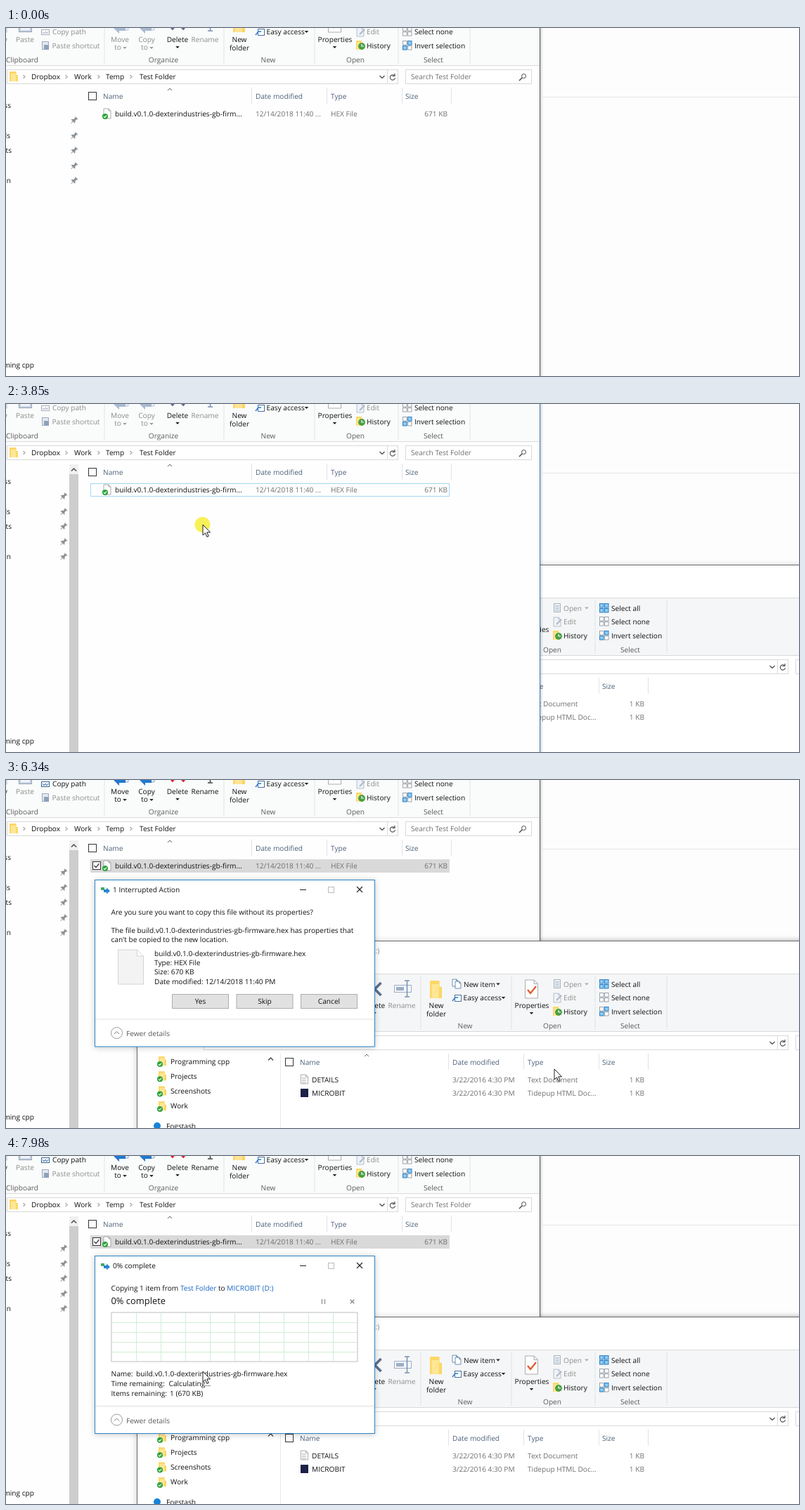
Write an HTML page that moves like this. It is 1128 px wide and 496 px high and loops after 8000 ms.

```html
<!DOCTYPE html>
<html lang="en">
<head>
<meta charset="utf-8">
<title>Copying a file to a drive</title>
<style>
  html, body { margin: 0; width: 100%; height: 100%; overflow: hidden; background: #fdfdfd; }
  svg { display: block; width: 100%; height: 100%; }
  text { font: 10.15px "Open Sans", "Noto Sans", sans-serif; text-rendering: geometricPrecision; white-space: pre; fill: #111; }
  .gray { fill: #8c8c8c; }
  .info { fill: #6f6f6f; }
  .label { fill: #5a5a5a; }
  .head { fill: #4c607a; }
  .white { fill: #fff; }
  .link { fill: #1a66c4; }
  .big { font-size: 12.9px; }
  .mid { text-anchor: middle; }
  .end { text-anchor: end; }
  .line { fill: none; stroke: #555; }
  .window { filter: drop-shadow(0 1px 4px rgba(0, 0, 0, .22)); }
</style>
</head>
<body>
<svg id="stage" viewBox="0 0 1128 496"></svg>
<script>
// Basic shapes. Text is placed by the middle of its capitals.
const text = (x, y, s, cls = '') => `<text x="${x}" y="${y + 4}" class="${cls}">${s}</text>`;
const mid = (x, y, s, cls = '') => text(x, y, s, 'mid ' + cls);
const rect = (x, y, w, h, fill, stroke = 'none') =>
  `<rect x="${x}" y="${y}" width="${w}" height="${h}" fill="${fill}" stroke="${stroke}"/>`;
const box = (x, y, w, h, fill, stroke) => rect(x + .5, y + .5, w - 1, h - 1, fill, stroke);
const line = (d, color = '#555', w = 1) => `<path class="line" d="${d}" style="stroke:${color};stroke-width:${w}"/>`;
const shape = (d, fill) => `<path d="${d}" fill="${fill}"/>`;
const dot = (x, y, r, fill, stroke = 'none') => `<circle cx="${x}" cy="${y}" r="${r}" fill="${fill}" stroke="${stroke}"/>`;
const group = (cls, body) => `<g class="${cls}">${body}</g>`;
const vline = (x, y, h, color = '#e2e3e4') => rect(x, y, 1, h, color);

// Icons
const drop = (x, y, color = '#222') => shape(`M${x - 2.8} ${y - 1}h5.6l-2.8 3z`, color);
const chevron = (x, y) => line(`M${x - 1.5} ${y - 2.5}l2.5 2.5l-2.5 2.5`, '#666');
const down = (x, y) => line(`M${x - 3.5} ${y - 2}l3.5 3.5l3.5 -3.5`, '#444', 1.2);
const up = (x, y) => line(`M${x - 3.5} ${y + 1.5}l3.5 -3.5l3.5 3.5`, '#444', 1.4);
const cross = (x, y, r, color, w) => line(`M${x - r} ${y - r}l${2 * r} ${2 * r}m0 ${-2 * r}l${-2 * r} ${2 * r}`, color, w);
const page = (x, y, w, h, fill = '#fff', stroke = '#999', f = w * .3) =>
  `<path d="M${x} ${y}h${w - f}l${f} ${f}v${h - f}h${-w}z M${x + w - f} ${y}v${f}h${f}" fill="${fill}" stroke="${stroke}" stroke-width=".8"/>`;
const folder = (x, y, w = 11, h = 13) =>
  shape(`M${x} ${y}h${w * .8}v${h * .35}h${w * .2}v${h * .65}h${-w}z`, '#fbd766') + rect(x + w * .15, y + h * .2, w * .6, h * .8, '#ffe694');
const badge = (x, y) => dot(x, y, 4, '#2da33b') + line(`M${x - 2} ${y}l1.5 1.6l2.7 -3`, '#fff', 1.1);
const pushpin = (x, y, k = 1, color = '#8b9299') =>
  `<g transform="translate(${x} ${y}) rotate(45) scale(${k})">` + shape('M-2.5 -5h5v1l-1 .7v2.8l2 2v1h-3v3.5h-1v-3.5h-3v-1l2 -2v-2.8l-1 -.7z', color) + '</g>';
const drive = (x, y) => rect(x - 6, y - 1, 12, 4.5, '#333') + shape(`M${x - 4} ${y - 3}h8l2 2h-12z`, '#999') + rect(x + 3, y + 1, 2, 1, '#9f9');
const checkbox = (x, y, on) => box(x, y, 12, 12, '#fff', '#333') + (on ? line(`M${x + 2.5} ${y + 6}l2.5 2.7l4.5 -5.5`, '#222', 1.2) : '');
const refresh = (x, y) => line(`M${x + 2.5} ${y - 2}a3.6 3.6 0 1 0 1 3M${x + 3} ${y - 5}v3.5h-3.5`, '#555', 1.2);
const tiles = (y, ...fills) => fills.map((f, i) =>
  box(844 + i % 2 * 7, y - 7 + (i >> 1) * 7, 6.5, 6.5, f, f === '#fff' ? '#9aa3ab' : '#2b7fc4')).join('');
const transfer = (x, on) => page(x + 4, 284, 17, 24, on ? '#e6f1fb' : '#e9eef5', on ? '#6d9bc8' : '#b3c0d2') +
  shape(`M${x} 305l8 -8v5h9v7h-9v4z`, on ? '#2277cf' : '#a9bad1');

// Explorer ribbon; `on` is the state with a file selected.
function ribbon(right, on) {
  const soft = on ? '' : 'gray', arrow = on ? '#222' : '#999', slate = '#5c6f8f';
  let s = rect(187, 277, right - 187, 81, on === null ? '#f5f6f7' : '#fafbfb') + rect(187, 358, right - 187, 1, '#d9dadb');
  s += [420, 590, 719, 838, 940].map(x => vline(x - .5, 280, 76)).join('');
  s += pushpin(220, 299, 2) + mid(221, 321, 'Pin to Quick') + mid(221, 332, 'access');
  s += page(260, 285, 14, 20, '#eef2f7', '#9fb0c8') + page(267, 291, 14, 20, '#eef2f7', '#9fb0c8') + mid(270, 321, 'Copy', on ? '' : 'gray');
  s += box(298, 286, 19, 25, '#c9d3e0', '#8fa1ba') + rect(303, 284, 9, 5, '#7d8fa9') + rect(301, 290, 13, 18, '#f2f5f9') + mid(307, 321, 'Paste', 'gray');
  s += line('M333 285l6 9M339 285l-6 9', '#8793a4') + dot(333, 296, 2, 'none', '#8793a4') + dot(339, 296, 2, 'none', '#8793a4') + text(346, 291, 'Cut', soft);
  s += box(330, 307, 12, 8, '#fff', on ? '#336699' : '#a4adb9') + line('M332 310l2 3l2 -3l2 3l2 -3', on ? '#336699' : '#a4adb9') + text(346, 310, 'Copy path', soft);
  s += box(331, 324, 10, 12, '#e4e9f0', '#9eabbc') + rect(334, 329, 7, 7, '#8fa1ba') + text(345.5, 329.5, 'Paste shortcut', 'gray');
  s += transfer(433, on) + mid(442, 321, 'Move', soft) + mid(439, 332, 'to', soft) + drop(449, 333, arrow);
  s += transfer(470, on) + mid(480, 321, 'Copy', soft) + mid(477, 332, 'to', soft) + drop(487, 333, arrow);
  s += cross(524.5, 298, 9, on ? '#d8242f' : slate, 3.6) + mid(524, 321, 'Delete') + drop(524, 332);
  s += box(552, 292, 25, 11, '#f3f6fa', on ? '#3a7fc2' : '#9caec7') + rect(555, 295, 11, 5, on ? '#3a7fc2' : '#9caec7') +
    line('M567 286h7M567 309h7M570.5 286v23', on ? '#444' : '#7890b0', 1.5) + mid(563, 321, 'Rename', soft);
  s += folder(603, 286, 17, 25) + mid(612, 321, 'New') + mid(612, 332.5, 'folder');
  s += page(635, 284, 8, 10, '#fff', '#48749f') + page(639, 287, 8, 10, '#fff', '#48749f') + text(651, 290.5, 'New item') + drop(700, 290.5);
  s += box(638, 306, 10, 10, '#fff', '#48749f') + line('M635 315l4 -5h4', '#2277cf', 1.4) + text(650.5, 310, 'Easy access') + drop(707.5, 310);
  s += page(738.5, 285, 18, 26) + line('M742 299l4 5l8 -10', '#e4572e', 2.2) + mid(748, 321, 'Properties') + drop(747.5, 332);
  s += box(779, 284, 10, 13, '#f0f3f6', '#a8b3bf') + line('M781 288h6M781 291h6M781 294h6', '#9ab') + text(793, 290.5, 'Open', 'gray') + drop(826, 290.5, '#aaa');
  s += page(779, 304, 10, 13, '#f0f3f6', '#a8b3bf') + line('M783 314l7 -7', '#a8b9cc', 2) + text(793, 310, 'Edit', 'gray');
  s += folder(778, 323, 10, 13) + dot(786, 331, 5, '#4aa043') + line('M786 328v3h3', '#fff', 1.2) + text(793, 329.5, 'History');
  s += tiles(291, ...Array(4).fill('#8ecbf5')) + text(861, 290.5, 'Select all');
  s += tiles(310, ...Array(4).fill('#fff')) + text(861, 310, 'Select none');
  s += tiles(330, '#fff', '#8ecbf5', '#8ecbf5', '#fff') + text(861, 329.5, 'Invert selection');
  return s + [[303, 'Clipboard'], [504, 'Organize'], [653, 'New'], [777, 'Open'], [888, 'Select']]
    .map(([x, name]) => mid(x, 350, name, 'label')).join('');
}

const addressBar = end => box(281, 364, end - 281, 21, '#fff', '#d9d9d9') + vline(end - 16, 365, 19, '#d9d9d9') +
  down(end - 23, 375) + refresh(end - 8, 375);

const columns = () => checkbox(397, 396) + line('M510 394l3 -3l3 3', '#666') +
  [[418, 'Name'], [635, 'Date modified'], [742, 'Type'], [848, 'Size']].map(([x, s]) => text(x, 401.5, s, 'head')).join('') +
  [629, 736, 843, 913].map(x => vline(x, 390, 23)).join('');

const fileRow = (y, name, date, type, size) => text(435, y, name) + text(635, y, date, 'info') +
  text(742, y, type, 'info') + text(908, y, size, 'info end');

function driveWindow() {
  let s = group('window', box(186, 229, 960, 300, '#fff', '#6a6a6a'));
  s += drive(201, 244) + vline(214.5, 237, 10, '#777') + page(225, 237, 10, 13) + line('M227 243l2.5 3l4 -5', '#e4572e', 1.5) +
    folder(245, 237) + line('M263 241.5h6') + drop(266, 245) + vline(276, 237, 10, '#777');
  s += rect(391, 232, 62, 25, '#bdf096') + rect(391, 257, 62, 20, '#f4fbee') + mid(422, 244, 'Drive Tools', 'label') + text(465, 242.5, 'MICROBIT (D:)', 'gray');
  s += ribbon(1128, null) + rect(187, 276, 941, 1, '#dadbdc') + rect(187, 257, 49, 20, '#1979ca') + mid(212, 267, 'File', 'white');
  s += box(236, 257, 52, 21, '#f5f6f7', '#dadbdc') + rect(237, 276, 50, 3, '#f5f6f7') +
    [[262, 'Home'], [314, 'Share'], [364, 'View'], [421, 'Manage']].map(([x, n]) => mid(x, 267, n)).join('');
  s += line('M209 374h-10l4 -4m-4 4l4 4M226 374h10l-4 -4m4 4l-4 4M248 373l3 3l3 -3', '#c8c8c8', 1.3) + line('M269 379v-9l-4 4m4 -4l4 4', '#444', 1.4);
  s += addressBar(1113) + box(1123, 364, 40, 21, '#fff', '#d9d9d9') + drive(291, 375) + chevron(306, 374) + text(316.5, 374, 'MICROBIT (D:)');
  s += ['Programming cpp', 'Projects', 'Screenshots', 'Work'].map((name, i) =>
    folder(217, 394 + i * 21.3) + badge(219, 405 + i * 21.3) + text(234, 400.5 + i * 21.3, name)).join('');
  s += dot(215, 493, 5, '#1683d8') + text(228, 492.5, 'Fogstash') + up(376.5, 398) + vline(390, 390, 106, '#e8e8e8');
  s += columns() + page(419.5, 420, 10, 13) + line('M421 425h6M421 428h6M421 431h6', '#aaa') + rect(419, 440, 11, 12, '#1c2148');
  return s + fileRow(427, 'DETAILS', '3/22/2016 4:30 PM', 'Text Document', '1 KB') +
    fileRow(446, 'MICROBIT', '3/22/2016 4:30 PM', 'Tidepup HTML Doc...', '1 KB');
}

function folderWindow() {
  const shifted = body => `<g transform="translate(-280 -305)">${body}</g>`;
  const pins = x => [131, 153, 174, 196, 217].map(y => pushpin(x, y + .5)).join('');
  const row = (fill, stroke) => box(120, 113, 511, 19, fill, stroke);
  let s = rect(0, 0, 759, 496, '#fefefe') + shifted(ribbon(1039, false)) + group('selected', shifted(ribbon(1039, true)));
  s += shifted(addressBar(838) + columns()) + folder(5, 62, 12, 14) + [26, 86, 132, 178].map(x => chevron(x, 69.5)).join('');
  s += [[36, 'Dropbox'], [97, 'Work'], [142, 'Temp'], [190, 'Test Folder']].map(([x, n]) => text(x, 69, n)).join('');
  s += box(568, 59, 180, 21, '#fff', '#d9d9d9') + text(576, 69, 'Search Test Folder', 'info') + dot(736.5, 68.5, 3, 'none', '#444') + line('M734 71l-4 4', '#444', 1.5);
  s += [[7, 110, 'Quick access'], [6, 153, 'Downloads'], [8, 174, 'Documents'], [7, 217, 'Plugin'], [40, 480, 'Programming cpp']]
    .map(([x, y, n]) => text(x, y, n, 'end')).join('');
  s += group('pinsWide', pins(97)) + group('pinsNarrow', pins(82));
  s += group('scrollbar', rect(90, 86, 13, 410, '#f0f0f0') + rect(90, 100, 13, 396, '#cdcdcd') + up(96.5, 94));
  s += group('focused', row('none', '#a5d6f5')) + group('hovered', row('#e5f3ff', '#c5e4fb') + checkbox(123, 116));
  s += group('selected', row('#cce8ff', '#99d1ff')) + group('inactive', row('#d9d9d9', '#d9d9d9')) + group('selected', checkbox(123, 116, true));
  s += page(139, 115, 10, 14) + badge(141, 126);
  s += shifted(fileRow(427, 'build.v0.1.0-dexterindustries-gb-firm...', '12/14/2018 11:40 ...', 'HEX File', '671 KB'));
  return s + rect(759, 0, 1, 496, '#555') + group('active', rect(759, 0, 1, 496, '#3d7ab8')) +
    [.16, .1, .06, .03].map((a, i) => rect(760 + i, 0, 1, 496, `rgba(0,0,0,${a})`)).join('');
}

function dialog(height, title, body) {
  const foot = 142 + height;
  return group('window', box(126, 142, 399, height, '#fff', '#2a84c9')) +
    rect(135, 153, 5, 4, '#46a957') + shape('M139 156h4v-2.5l5 4.5l-5 4.5v-2.5h-4z', '#2585cf') + text(152, 156, title) +
    line('M418 156.5h9', '#222') + box(458, 152, 9, 9, 'none', '#bbb') + cross(503, 156, 4, '#222', 1.1) + body +
    rect(127, foot - 40, 397, 1, '#dfdfdf') + dot(157.5, foot - 20, 8, 'none', '#999') + line(`M154 ${foot - 18.5}l3.5 -3.5l3.5 3.5`, '#777') +
    text(171, foot - 19.5, 'Fewer details', 'label');
}

function question() {
  const button = (x, name, fill = '#e1e1e1', stroke = '#adadad') => box(x, 305, 81, 21, fill, stroke) + mid(x + 40.5, 315, name);
  const lines = ['build.v0.1.0-dexterindustries-gb-firmware.hex', 'Type: HEX File', 'Size: 670 KB', 'Date modified: 12/14/2018 11:40 PM'];
  return dialog(238.5, '1 Interrupted Action',
    text(149.5, 187.5, 'Are you sure you want to copy this file without its properties?') +
    text(149.5, 214, 'The file build.v0.1.0-dexterindustries-gb-firmware.hex has properties that') +
    text(149.5, 227, 'can\'t be copied to the new location.') +
    page(159.5, 242, 36, 49, '#f3f3f3', '#ccc', 9) +
    lines.map((s, i) => text(211, 247 + i * 13.2, s)).join('') +
    button(236, 'Yes') + button(327.5, 'Skip') + button(419, 'Cancel') +
    group('overSkip', button(327.5, 'Skip', '#e5f1fb', '#2a84d2')) +
    group('overYes', button(236, 'Yes', '#e5f1fb', '#2a84d2')) +
    group('pressYes', button(236, 'Yes', '#cce4f7', '#005499')));
}

function progress() {
  let grid = '';
  for (let i = 1; i < 10; i++) grid += `M${150 + i * 35}.5 224v68`;
  for (let i = 1; i < 5; i++) grid += `M151 ${223.5 + i * 14}h348`;
  return dialog(254, '0% complete',
    `<text x="149.5" y="191.5">Copying 1 item from <tspan class="link">Test Folder</tspan> to <tspan class="link">MICROBIT (D:)</tspan></text>` +
    text(149.5, 206.5, '0% complete', 'big') + line('M449.5 204v7M453.5 204v7', '#999', 1.4) + cross(492.5, 207.5, 2.8, '#888', 1.3) +
    line(grid, '#d0eed3') + box(149.5, 222.5, 351, 71, 'none', '#bdbdbd') +
    text(149.5, 309.5, 'Name:') + text(185, 309.5, 'build.v0.1.0-dexterindustries-gb-firmware.hex') +
    text(149.5, 323.5, 'Time remaining:') + text(231.5, 323.5, 'Calculating...') +
    text(149.5, 337.5, 'Items remaining:') + text(233, 337.5, '1 (670 KB)'));
}

const pointer = () =>
  group('dragged', group('window', `<g opacity=".78">${rect(-46, -83, 93, 93, '#e6f2fa', '#c4dcec')}${page(-28, -74, 56, 75, '#f4f6f7', '#a9b4bb', 16)}</g>`)) +
  group('tip', box(11, 12, 132, 18, '#fff', '#bbb') + line('M18.5 17v8M14.5 21h8', '#2369c7', 1.5) + text(26, 20.5, 'Copy to <tspan class="link">MICROBIT (D:)</tspan>')) +
  group('pressed', dot(-.5, 0, 11, '#f5ee35" fill-opacity=".82')) +
  '<path d="M0 0v15l3.5 -3.2l2.4 5.6l2.3 -1l-2.4 -5.5h4.7z" fill="#fff" stroke="#111" stroke-width=".95"/>';

document.getElementById('stage').innerHTML =
  rect(0, 0, 1128, 496, '#fdfdfd') + rect(764, 98, 364, 1, '#e3e3e3') +
  group('driveBack', driveWindow()) + folderWindow() + group('driveFront', driveWindow()) +
  group('asking', question()) + group('copying', progress()) +
  group('pointer', group('shown', pointer()));

// Stepped keyframes over the 8 s loop
const LOOP = 8000;
const keyframes = (name, prop, steps) =>
  `@keyframes ${name}{${steps.map(([t, v]) => `${t / LOOP * 100}%{${prop}:${v}}`).join('')}}` +
  `.${name}{animation:${name} ${LOOP}ms step-end infinite}`;
// Hidden at first, then switched at each time
const toggles = (name, ...times) =>
  keyframes(name, 'opacity', [[0, 0], ...times.map((t, i) => [t, (i + 1) % 2])]);

const path = [
  [0, 638, 360], [570, 638, 285], [650, 556, 222], [730, 522, 195],
  [2770, 520, 199], [2850, 505, 196], [2930, 460, 184], [3010, 405, 168], [3090, 366, 156], [3160, 354, 152],
  [3470, 336, 157], [3540, 300, 168], [3620, 280, 172],
  [4020, 281, 168], [4100, 282, 158], [4180, 284, 145], [4250, 286, 134], [4330, 288, 126], [4480, 290, 121],
  [4940, 296, 125], [5020, 318, 138], [5100, 350, 154], [5170, 384, 167], [5250, 690, 318], [5330, 897, 424],
  [5640, 898, 432], [5720, 898, 445], [5790, 899, 456], [5870, 899, 461],
  [6180, 890, 457], [6260, 850, 440], [6340, 780, 412], [6420, 700, 384], [6500, 625, 359], [6580, 565, 340], [6660, 535, 331], [6730, 527, 328],
  [6960, 377, 319], [7040, 345, 316], [7110, 318, 313], [7190, 298, 310], [7260, 286, 308], [7340, 280, 307]
];

const style = document.createElement('style');
style.textContent =
  keyframes('pointer', 'transform', path.map(([t, x, y]) => [t, `translate(${x}px,${y}px)`])) +
  keyframes('driveFront', 'opacity', [[0, 0], [2540, .5], [2620, 1], [3850, 0], [6020, 1]]) +
  keyframes('pinsWide', 'opacity', [[0, 1], [1820, 0]]) +
  toggles('shown', 500) + toggles('scrollbar', 1820) + toggles('pinsNarrow', 1910) +
  toggles('driveBack', 2620) + toggles('active', 3850, 6020) +
  toggles('focused', 3850, 4710) + toggles('hovered', 4330, 4710) + toggles('selected', 4710) +
  toggles('inactive', 6260) + toggles('pressed', 3850, 4020, 4710, 6020, 7510, 7580) +
  toggles('dragged', 4940, 6020) + toggles('tip', 5330, 6020) +
  toggles('asking', 6260, 7750) + toggles('overSkip', 6960, 7110) + toggles('overYes', 7110) +
  toggles('pressYes', 7510, 7580) + toggles('copying', 7750);
document.head.append(style);
</script>
</body>
</html>
```
